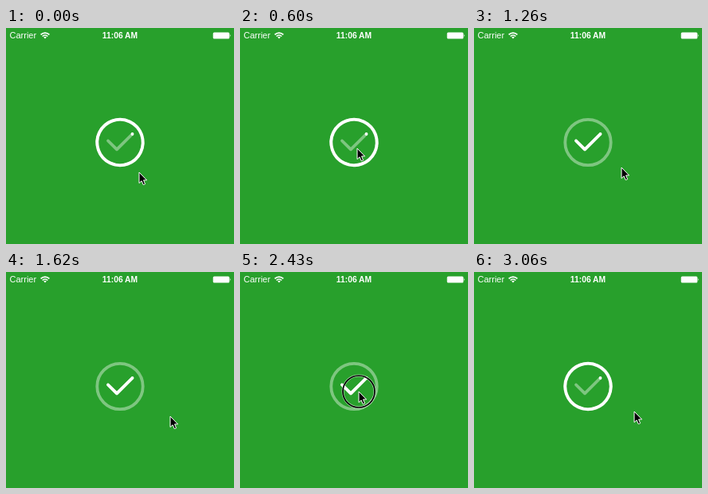
These frames come from a looping animation (286 px wide and 271 px high, 3.09 s). An HTML page:

```html
<!DOCTYPE html>
<html lang="en">
<head>
<meta charset="utf-8">
<title>Check button</title>
<style>
  html, body { margin: 0; width: 100%; height: 100%; overflow: hidden; background: #28a02c; }
  svg { display: block; width: 286px; height: 271px; }
  text { font-family: "Liberation Sans", Arial, sans-serif; fill: #fff; }
  .line { fill: none; stroke: #fff; stroke-width: 3.8; stroke-linecap: round; stroke-linejoin: round; }
  .faint { opacity: .4; }
</style>
</head>
<body>
<svg viewBox="0 0 286 271">
  <text x="4.5" y="13.3" font-size="11">Carrier</text>
  <g fill="none" stroke="#fff" stroke-width="1.7">
    <path d="M43.6 8.3A7.6 7.6 0 0 1 54.4 8.3M45.7 10.5A4.7 4.7 0 0 1 52.3 10.5"/>
    <path d="M49 13.4L47.2 11.6A2.6 2.6 0 0 1 50.8 11.6Z" fill="#fff" stroke="none"/>
  </g>
  <text x="143" y="13.3" font-size="10.3" font-weight="bold" text-anchor="middle">11:06 AM</text>
  <rect x="259.7" y="5.5" width="20.6" height="8" rx="1.5" fill="#fff"/>
  <path d="M280.8 7.8Q282.6 9.5 280.8 11.2Z" fill="#fff"/>

  <circle class="line faint" cx="143" cy="143.5" r="28.7"/>
  <path class="line faint" d="M158.5 133L139 152.3L128 141.5"/>
  <path class="line" id="stroke" d="M158.5 133L139 152.3L128 141.5L117.2 130.9A28.7 28.7 0 1 1 117.2 130.9"/>

  <g id="cursor">
    <g id="ring" fill="none">
      <circle r="20" stroke="#fff" stroke-opacity=".6" stroke-width="3"/>
      <circle r="20" stroke="#000" stroke-width="1.7"/>
    </g>
    <path d="M0 0V13.6L3.1 10.8L5.2 15.7L7.6 14.7L5.5 9.9H9.6Z" fill="#000" stroke="#fff"/>
  </g>
</svg>
<script>
const LOOP = 3090, STEP = 30, DURATION = 500;
const TO_CHECK = 667, TO_CIRCLE = 2432;
const CX = 143, CY = 143.5, R = 28.7;
const $ = id => document.getElementById(id);

// Path landmarks: end of the check, start of the circle, end of the circle
const LONG = Math.hypot(19.5, 19.3), SHORT = Math.hypot(11, 10.8);
const checkEnd = LONG + SHORT;
const circleStart = checkEnd + Math.hypot(10.8, 10.6);
const pathEnd = circleStart + 2 * Math.PI * R;

// The last arc needs two halves, because its ends coincide
const x0 = 117.2, y0 = 130.9;
$('stroke').setAttribute('d', `M158.5 133L139 152.3L128 141.5L${x0} ${y0}` +
  `A${R} ${R} 0 0 1 ${2 * CX - x0} ${2 * CY - y0}A${R} ${R} 0 0 1 ${x0} ${y0}`);

const clamp = (v, lo, hi) => Math.min(hi, Math.max(lo, v));
const cubic = (a, b, s) => 3 * a * s * (1 - s) ** 2 + 3 * b * s * s * (1 - s) + s ** 3;

// Cubic bezier timing with a pull-back at the start
function swing(x) {
  if (x <= 0) return 0;
  if (x >= 1) return 1;
  let lo = 0, hi = 1;
  for (let i = 0; i < 24; i++) {
    const mid = (lo + hi) / 2;
    if (cubic(.25, .5, mid) < x) lo = mid; else hi = mid;
  }
  return cubic(-.4, 1, lo);
}

const hold = () => 0;
const speedUp = p => p * p;
const slowDown = p => p * (2 - p);
const smooth = p => p * p * (3 - 2 * p);

// Time, x, y and easing towards the next stop
const stops = [
  [0, 167, 181, hold], [60, 167, 181, smooth], [450, 147, 151, hold],
  [1080, 147, 151, speedUp], [1260, 185, 175, slowDown], [1380, 206, 181, hold],
  [1680, 206, 181, speedUp], [1980, 167, 171, slowDown], [2250, 149, 150, hold],
  [2700, 149, 150, speedUp], [2790, 158, 154, slowDown], [3030, 201, 175, hold],
  [LOOP, 201, 175, hold]
];

function cursorAt(t) {
  const i = stops.findIndex(s => s[0] > t);
  const [ta, xa, ya, ease] = stops[i - 1], [tb, xb, yb] = stops[i];
  const p = ease((t - ta) / (tb - ta));
  return [xa + (xb - xa) * p, ya + (yb - ya) * p];
}

function draw(t) {
  const circle = t < TO_CIRCLE
    ? 1 - swing((t - TO_CHECK) / DURATION)
    : swing((t - TO_CIRCLE) / DURATION);
  const from = clamp(circleStart * circle, 0, pathEnd);
  const to = clamp(checkEnd + (pathEnd - checkEnd) * circle, from, pathEnd);
  $('stroke').setAttribute('stroke-dasharray', `0 ${from} ${to - from} 999`);

  $('cursor').setAttribute('transform', `translate(${cursorAt(t)})`);
  const pressed = [TO_CHECK, TO_CIRCLE].some(c => t >= c - 40 && t < c + 80);
  $('ring').setAttribute('visibility', pressed ? 'visible' : 'hidden');
}

const began = performance.now();
function tick() {
  const t = (performance.now() - began) % LOOP;
  draw(Math.floor(t / STEP) * STEP);
  requestAnimationFrame(tick);
}
tick();
</script>
</body>
</html>
```
